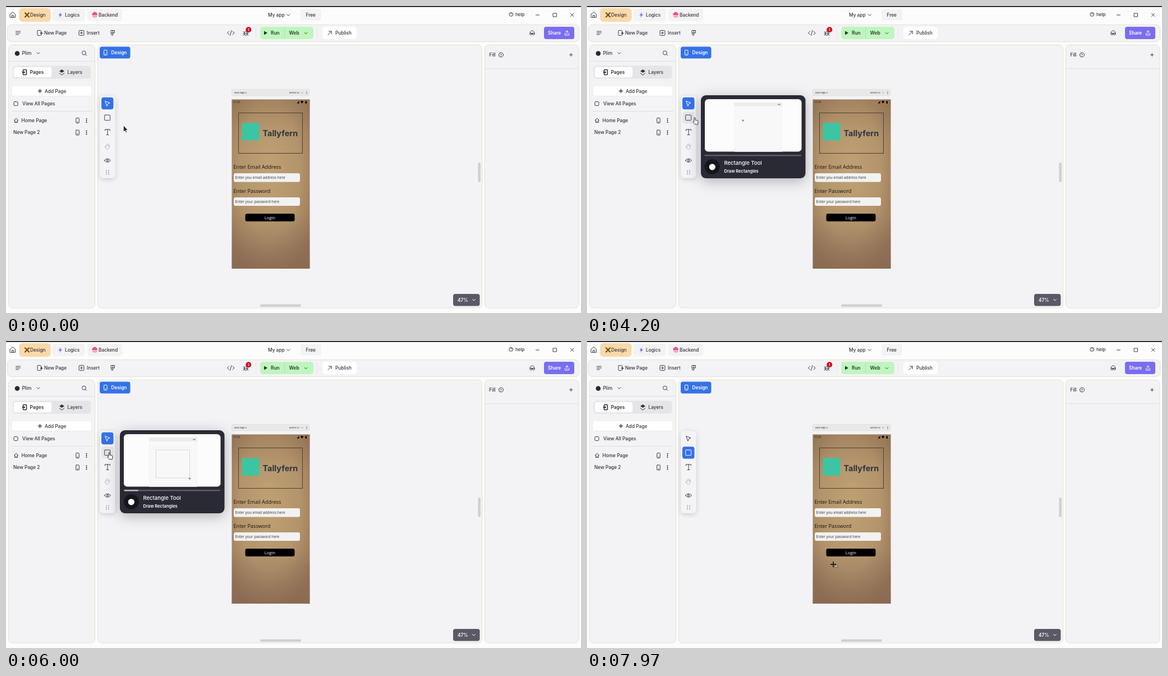
An HTML page for the animation above (8000 ms loop, 1025 by 547 pixels).

```html
<!DOCTYPE html>
<html lang="en">
<head>
<meta charset="utf-8">
<title>App builder</title>
<style>
html, body { margin: 0; width: 100%; height: 100%; overflow: hidden; background: #fcfcfc; }
svg { display: block; }
text { font: 500 8.3px Inter, sans-serif; fill: #34353b; }
.b { font-weight: 600; }
.w { fill: #fff; }
.tiny { font-size: 3.9px; }
.form text { font-family: "Open Sans", sans-serif; font-weight: 400; }
.i { fill: none; stroke: #3a3b42; stroke-width: 1; stroke-linecap: round; stroke-linejoin: round; }
.panel { fill: #f3f3f6; stroke: #e3e3d2; }
.s { stroke: #e2e2e2; stroke-width: .6; }
</style>
</head>
<body>
<svg width="1025" height="547" viewBox="0 0 1025 547">
<defs>
  <radialGradient id="glow" cx=".48" cy=".42" r=".65">
    <stop offset="0" stop-color="#bfa174"/><stop offset=".6" stop-color="#b3946b"/><stop offset="1" stop-color="#977858"/>
  </radialGradient>
  <linearGradient id="shade" x2="0" y2="1">
    <stop offset="0" stop-color="#8a6c50" stop-opacity=".35"/><stop offset=".2" stop-color="#8a6c50" stop-opacity="0"/>
    <stop offset=".68" stop-color="#7f5f50" stop-opacity="0"/><stop offset="1" stop-color="#7f5f50" stop-opacity=".55"/>
  </linearGradient>
  <filter id="soft" x="-40%" y="-40%" width="180%" height="180%"><feDropShadow dx="0" dy="2" stdDeviation="4" flood-opacity=".18"/></filter>
  <filter id="deep" x="-30%" y="-30%" width="160%" height="160%"><feDropShadow dx="0" dy="5" stdDeviation="12" flood-opacity=".28"/></filter>
  <path id="down" class="i" d="M-2.5-1.2 0 1.3 2.5-1.2"/>
  <g id="device"><rect class="i" x="-2.8" y="-4.5" width="5.6" height="9" rx="1"/><path class="i" d="M-.7 2.7H.7"/></g>
  <g id="dots"><circle cy="-3" r=".9"/><circle r=".9"/><circle cy="3" r=".9"/></g>
  <path id="arrow" class="i" d="M-3.5-4 4-.9.7.6-.9 4Z"/>
</defs>

<rect width="1025" height="547" fill="#fcfcfc"/>
<rect width="1025" height="1.6"/>

<!-- title bar -->
<rect x="24" y="4.500" width="55" height="23" rx="5" fill="#fbd9a9" stroke="#efcf9d" stroke-width=".7"/>
<rect x="83" y="5" width="58" height="22" rx="5" fill="#f3f3f4"/>
<rect x="145" y="5" width="62" height="22" rx="5" fill="#f3f3f4"/>
<rect x="525" y="6" width="37" height="20" rx="4" fill="#f3f3f4"/>
<path class="i" d="M7.500 14.500 12 10.700 16.500 14.500V20.300H7.500ZM10.600 20V16.500H13.400V20"/>
<path d="M34 12.300 41 19.500M41 12.300 34 19.500" stroke="#754c12" stroke-width="2.200" stroke-linecap="round"/>
<path d="M98 11 93.500 16.800H96.500L95 21 100 15H97Z" fill="#7167ee"/>
<path d="M154 16.500a2.400 2.400 0 0 1 1-4 3.500 3.500 0 0 1 6.300-.2 2.500 2.500 0 0 1 1 4.200Z" fill="#ee4f86"/>
<path d="M155.500 17.500V20M158.300 17.500V21M161 17.500V20" stroke="#ee4f86" stroke-width="1.300"/>
<text x="43" y="19">Design</text><text x="105" y="19">Logics</text><text x="165" y="19">Backend</text>
<text x="467" y="19">My app</text><use href="#down" x="503.500" y="16"/>
<text x="534.500" y="19">Free</text>
<circle class="i" cx="900.300" cy="15" r="3.400" stroke-width=".8"/><text x="898.800" y="17.200" style="font-size:6px">?</text>
<text x="908" y="18" style="font-size:8px">help</text>
<path class="i" d="M944.500 16H950.500M975.500 13H981.500V19H975.500ZM1006.500 13 1012 18.600M1012 13 1006.500 18.600"/>

<!-- command bar -->
<rect class="panel" x="2.500" y="33.500" width="1019" height="30" rx="7"/>
<path class="i" d="M17.500 45.200H25.500M17.500 48H25.500M17.500 50.800H22.500"/>
<rect class="i" x="56" y="43.500" width="6.500" height="9" rx="1"/><path class="i" d="M61 48.500H65.500M63.250 46.300V50.700"/>
<rect class="i" x="130" y="43.500" width="9" height="9" rx="1.500"/><path class="i" d="M132.200 48H136.800M134.500 45.700V50.300"/>
<path class="i" d="M187.500 43.500H193.500V48H187.500ZM190.500 43.500V52M187.500 48V50.500a1.500 1.500 0 0 0 3 0"/>
<text x="68" y="51">New Page</text><text x="144" y="51">Insert</text>
<path class="i" d="M397.500 45 394.500 48 397.500 51M404 45 407 48 404 51M402 43.500 399.500 52.500"/>
<ellipse class="i" cx="427.500" cy="49" rx="2.600" ry="3.500"/><path class="i" d="M423 46 425 47M423 49H425M423 52 425 51M430 49H432M430 51 432 52M425.500 49H429.500"/>
<circle cx="432.300" cy="42.300" r="5" fill="#c81423"/><text class="w b" x="430.900" y="44.500" style="font-size:6px">1</text>
<path d="M445.500 38V58M554.500 38V58" stroke="#e6e6e6"/>
<rect x="453" y="37" width="95" height="22" rx="5" fill="#bff6bd"/><path d="M496.500 38V58" stroke="#a8e6a8"/>
<path d="M460 44.500V51.500L466 48Z" fill="#163c20"/>
<text class="b" x="472" y="51" fill="#1d3826">Run</text><text class="b" x="504.500" y="51.300">Web</text><use href="#down" x="534.500" y="48.500"/>
<rect x="564" y="37" width="61" height="22" rx="5" fill="#fff"/>
<path class="i" d="M574 51.500 580 45.300M575.500 45H580.200V49.800"/><text x="587" y="51">Publish</text>
<path class="i" d="M934 48a4 4 0 0 1 8 0M934 48.500H942"/><circle class="i" cx="935.700" cy="50" r="1.700"/><circle class="i" cx="940.300" cy="50" r="1.700"/>
<rect x="959" y="37" width="54" height="22" rx="4" fill="#796df0"/><text class="w b" x="966" y="51">Share</text>
<path class="i" style="stroke:#fff" d="M996.500 48.500V52H1003.500V48.500M1000 50V44M997.700 46.200 1000 44 1002.300 46.200"/>

<!-- side panels and canvas -->
<rect class="panel" x="4.500" y="69.500" width="154" height="468.500" rx="7"/>
<rect class="panel" x="163.500" y="69.500" width="685" height="468.500" rx="7"/>
<rect class="panel" x="853.500" y="69.500" width="167.500" height="468.500" rx="7"/>
<circle cx="20" cy="84.500" r="4.300" fill="#292a30"/>
<text x="28.500" y="87">Plim</text><use href="#down" x="57.500" y="84"/>
<circle class="i" cx="139" cy="83.500" r="3.500"/><path class="i" d="M141.700 86.200 143.800 88.300"/>
<path d="M5 98.500H158M10 187.500H154M854 111.500H1021" stroke="#dedee0"/>
<rect x="11.500" y="106.500" width="140" height="23" rx="5" fill="#e5e5e8"/>
<rect class="s" x="13.500" y="108.500" width="68" height="19" rx="4" fill="#fff"/>
<rect x="30.500" y="113.500" width="6" height="9" rx="1" fill="none" stroke="#292a30" stroke-width="1.500"/><path d="M29 118H34" stroke="#292a30" stroke-width="2"/>
<text class="b" x="42.500" y="121">Pages</text>
<path d="M95 116 99.500 113 104 116 99.500 119ZM95 119 99.500 122.500 104 119V120L99.500 123.500 95 120Z" fill="#34353b"/>
<text x="109.500" y="121">Layers</text>
<rect class="s" x="10" y="142" width="143" height="18.500" rx="4" fill="#fff"/>
<path class="i" style="stroke-width:1.500" d="M57.500 151.500H63.500M60.500 148.500V154.500"/><text x="69" y="154.500">Add Page</text>
<rect class="i" x="14" y="170.500" width="7" height="7" rx="1.500" stroke-width=".8"/><text x="29" y="177">View All Pages</text>
<path class="i" d="M14.500 203.500 18 200.300 21.500 203.500M15.500 203V207.500H20.500V203M18 207V205"/>
<text x="27.500" y="207">Home Page</text><text x="13" y="228.300">New Page 2</text>
<use href="#device" x="127.500" y="204"/><use href="#device" x="127.500" y="225.500"/>
<use href="#dots" x="143.500" y="204"/><use href="#dots" x="143.500" y="225.500"/>
<text x="861.500" y="90">Fill</text><circle class="i" cx="882.500" cy="87" r="4"/><text x="880.600" y="89.500" style="font-size:6.500px">?</text>
<path class="i" d="M1004.500 87H1010M1007.250 84.250V89.750"/>
<rect x="167" y="72.500" width="54.500" height="21" rx="4" fill="#3572e6"/>
<g style="--c:#fff"><rect class="i" x="174.500" y="78.500" width="5.500" height="9" rx="1" style="stroke:#fff"/><path class="i" style="stroke:#fff" d="M176.600 85.700H178"/></g>
<text class="w b" x="187.500" y="86.300">Design</text>
<rect x="841.500" y="279" width="4.500" height="34.500" rx="2" fill="#cfcfd4"/>
<rect x="453" y="531.500" width="73" height="4.500" rx="2" fill="#cfcfd4"/>
<rect x="797" y="513" width="47.500" height="21.500" rx="4" fill="#595a66"/><text class="w b" x="805" y="527">47%</text>
<path class="i" style="stroke:#fff" d="M831.500 522.500 834 525 836.500 522.500"/>

<!-- phone page -->
<g class="form">
  <rect x="402.500" y="148.500" width="138.500" height="11.500" rx="2" fill="#e9e9ea" stroke="#d8d8d8" stroke-width=".6"/>
  <text class="tiny" x="407" y="156" style="font-family:Inter,sans-serif">New Page 2</text>
  <text class="tiny" x="505" y="156" style="font-family:Inter,sans-serif">Morvix 14</text>
  <use href="#down" transform="translate(528 154.500) scale(.5)"/><use href="#dots" transform="translate(536 154.500) scale(.6)"/>
  <rect x="402.500" y="166.500" width="139" height="301.500" fill="url(#glow)"/>
  <rect x="402.500" y="166.500" width="139" height="301.500" fill="url(#shade)"/>
  <text x="405.500" y="172.800" style="font:600 4.600px Inter,sans-serif">17:20</text>
  <path d="M518.500 173.500H522.500V169ZM525 170.200a4 4 0 0 1 5.200 0L527.600 173.700ZM533.500 169.500H536V173.700H533.500Z"/>
  <rect x="414.500" y="190.500" width="114" height="72" fill="none" stroke="#4b4032"/>
  <rect x="420.500" y="208.500" width="31" height="31" fill="#3cc5a2"/>
  <text x="457.500" y="232" style="font:700 14.400px Inter,sans-serif;fill:#2c3541">Tallyfern</text>
  <g style="--size:9px">
    <text x="405.500" y="289.800" style="font-size:9.100px;fill:#15120e">Enter Email Address</text>
    <text x="405.500" y="333.300" style="font-size:9.100px;fill:#15120e">Enter Password</text>
  </g>
  <rect x="406" y="298" width="118" height="15.500" rx="3" fill="#f2f2f2"/><rect x="406" y="341" width="118" height="15" rx="3" fill="#f2f2f2"/>
  <text x="408.500" y="308.200" style="font-size:6.550px">Enter you email address here</text>
  <text x="408.500" y="351.200" style="font-size:6.550px">Enter your password here</text>
  <rect x="426.500" y="370" width="88" height="13.800" rx="3"/><text class="w" x="460.800" y="379.900" style="font-size:7.500px">Login</text>
</g>

<!-- tool strip -->
<rect x="167.500" y="160.500" width="27" height="146" rx="6" fill="#f4f4f7" filter="url(#soft)"/>
<rect id="hover" x="170" y="188.500" width="21.500" height="21" rx="4" fill="#e6e6ea"/>
<rect id="active" x="170" width="21.500" height="21.500" rx="4" fill="#3572e6"/>
<path id="pick" class="i" d="M177 169.500 185 172.700 181.700 174.100 180 178Z"/>
<rect id="box" class="i" x="175.700" y="194.200" width="10" height="9.500" rx="1"/>
<path class="i" d="M176.500 222V220H185.500V222M181 220V229.500M179 229.500H183"/>
<path class="i" style="stroke:#bdbdc2" d="M178 251V247.500M180 249.500V245.500M182 249.500V245.700M184 250.500V247V252a3.500 3.500 0 0 1-6.500 1.500L176 250.500 178 252"/>
<path class="i" d="M175.500 275.200Q181 268.700 186.500 275.200 181 281.700 175.500 275.200Z"/><circle class="i" cx="181" cy="275.200" r="1.600"/>
<g fill="#9b9ba2"><use href="#dots" x="179" y="296.500"/><use href="#dots" x="183" y="296.500"/></g>

<!-- tool preview -->
<g id="card">
  <rect x="203" y="159" width="186.500" height="148" rx="9" fill="#2a2c35" filter="url(#deep)"/>
  <rect x="210" y="166" width="172.500" height="93.500" rx="6" fill="#fcfcfc"/>
  <g id="page">
    <rect x="255.500" y="172" width="85" height="87.500" fill="#f8f8f8" stroke="#eee" stroke-width=".6"/>
    <rect x="255.500" y="172" width="85" height="6.500" fill="#ececee"/>
    <path d="M333.500 175.500H337.500" stroke="#77777d" stroke-width="1.500"/>
  </g>
  <rect id="drawn" x="267.500" y="194" fill="none" stroke="#c9c9cd" stroke-width=".7"/>
  <path id="cross" d="M-2 0H2M0-2V2" stroke="#55555b" stroke-width=".8"/>
  <rect x="210.500" y="265" width="171.500" height="2.500" rx="1" fill="#5c5e67"/>
  <rect id="bar" x="210.500" y="265" height="2.500" rx="1" fill="#b9bac0"/>
  <circle cx="223.300" cy="286.300" r="13.300" fill="#15161b"/><circle cx="223.300" cy="286.800" r="5.600" fill="#fff"/>
  <text class="w" x="244.500" y="283.300" style="font-size:9.500px">Rectangle Tool</text>
  <text class="w b" x="244.500" y="297" style="font-size:7.500px">Draw Rectangles</text>
</g>

<!-- pointers, tip at 0,0 -->
<path id="point" d="M0 0V11L2.600 8.700 4.300 12.600 6 11.800 4.400 8H7.700Z" fill="#222" stroke="#fff" stroke-width=".6"/>
<path id="hand" d="M-2-4.500a1 1 0 0 1 2 0V-.8L4.200.2Q5.200.6 5 2L4.300 6.800H-.8L-4 2.600Q-4 1-2 2Z" fill="#fff" stroke="#222" stroke-width=".9"/>
<g id="plus"><path d="M-5 0H5M0-5V5" stroke="#222" stroke-width="1.800"/><rect x="2.800" y="1.700" width="5" height="3.300" rx=".7" fill="#ddd" stroke="#333" stroke-width=".8"/></g>
</svg>
<script>
const $ = id => document.getElementById(id);
const set = (id, attrs) => { for (const k in attrs) $(id).setAttribute(k, attrs[k]); };
const show = (id, on) => set(id, { opacity: +on });
const moveTo = (id, [x, y]) => set(id, { transform: `translate(${x} ${y})` });

// Interpolates between keys of the form [time, ...values].
function track(t, keys, ease = p => p) {
  const n = keys.findIndex(k => k[0] > t);
  if (n === 0) return keys[0].slice(1);
  if (n < 0) return keys.at(-1).slice(1);
  const a = keys[n - 1], b = keys[n], p = ease((t - a[0]) / (b[0] - a[0]));
  return a.slice(1).map((v, i) => v + (b[i + 1] - v) * p);
}
const smooth = p => p * p * (3 - 2 * p);

const pointer = [[3660, 209.5, 213], [3950, 194, 205], [4200, 193, 204], [4500, 193, 204],
  [4750, 185, 204], [7200, 185, 204], [7840, 437, 396], [7970, 439, 398]];
const cardFade = [[3940, 0], [4130, 1], [7000, 1], [7150, 0]];
const progress = [[4100, .6], [5120, .6], [7150, 58]];
const pageShift = [[4250, 7], [4700, 0]];
const drawn = [[5130, 0, 0], [5440, 53.5, 50], [5560, 60, 50]];
const cross = [[4200, 278, 204], [4700, 267.5, 194], [5130, 267.5, 194], [5440, 325, 247],
  [5560, 329, 246], [5950, 329, 246], [6300, 303, 230]];

function render(t) {
  const at = track(t, pointer, smooth), selected = t >= 7000;
  const kind = t < 3900 ? 'point' : selected && at[0] > 196 ? 'plus' : 'hand';
  for (const id of ['point', 'hand', 'plus']) {
    show(id, id === kind);
    moveTo(id, at);
  }
  show('hover', t > 3920 && !selected);
  set('active', { y: selected ? 188.3 : 162.7 });
  $('pick').style.stroke = selected ? '' : '#fff';
  $('box').style.stroke = selected ? '#fff' : '';

  set('card', { opacity: track(t, cardFade)[0] });
  set('bar', { width: track(t, progress)[0] });
  moveTo('page', [track(t, pageShift, smooth)[0], 0]);
  const [width, height] = track(t, drawn, smooth);
  set('drawn', { width, height });
  moveTo('cross', track(t, cross, smooth));
}

function frame() {
  render(performance.now() % 8000);
  requestAnimationFrame(frame);
}
frame();
</script>
</body>
</html>
```
